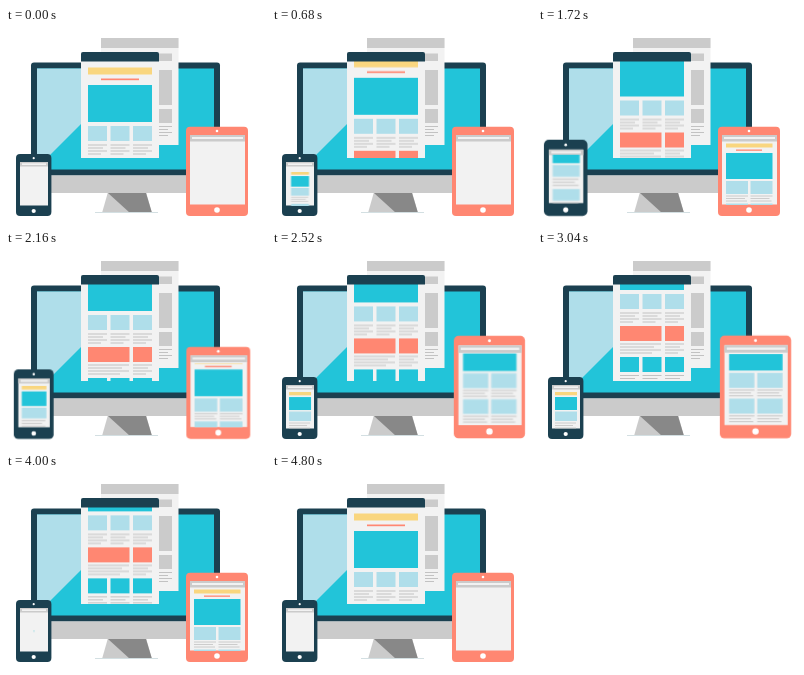
Animation of 260 by 195 pixels, one loop 5040 ms. Source, as an HTML page:

```html
<!DOCTYPE html>
<html lang="en">
<head>
<meta charset="utf-8">
<title>Responsive page</title>
<style>
  html, body { margin: 0; width: 100%; height: 100%; overflow: hidden; background: #fff; }
  svg { display: block; width: 100vw; height: 100vh; }

  .dark { fill: #1b4050; }
  .cyan { fill: #22c4d9; }
  .pale { fill: #afdeea; }
  .coral { fill: #ff8772; }
  .yellow { fill: #f9d67f; }
  .paper { fill: #f2f2f2; }
  .grey { fill: #cbcbcb; }
  .white { fill: #fff; }
  .text { fill: none; stroke: #c2c2c2; }

  .move { animation: 5040ms cubic-bezier(.65, 0, .35, 1) infinite; }
  #deskScroll { animation-name: deskScroll; animation-timing-function: linear; }
  #phone { animation-name: phoneGrow; transform-origin: 27.7px 188px; }
  #phonePage { animation-name: phonePage; transform-origin: 28px 157px; }
  #phoneScroll { animation-name: phoneScroll; }
  #tablet { animation-name: tabletGrow; transform-origin: 211px 188px; }
  #tabletPage { animation-name: tabletPage; transform-origin: 211px 142px; }
  #tabletScroll { animation-name: tabletScroll; }

  @keyframes deskScroll {
    0%, 4.76% { transform: translateY(0); }
    25.4% { transform: translateY(-17px); }
    42.86% { transform: translateY(-34px); }
    60.32% { transform: translateY(-55px); }
    69.84% { transform: translateY(-67.5px); }
    73.02% { transform: translateY(-67.5px); animation-timing-function: cubic-bezier(.45, 0, .55, 1); }
    95.24%, 100% { transform: translateY(0); }
  }
  @keyframes phoneGrow {
    0%, 17.86% { transform: scale(1); }
    32.14%, 35.9% { transform: scale(1.23); }
    50.2%, 100% { transform: scale(1); }
  }
  @keyframes phonePage {
    0%, 4.37% { transform: scale(0); }
    18.65%, 67.94% { transform: scale(1); }
    82.22%, 100% { transform: scale(0); }
  }
  @keyframes phoneScroll {
    0%, 25.4% { transform: translateY(0); }
    34.1% { transform: translateY(-14px); }
    44.8%, 100% { transform: translateY(0); }
  }
  @keyframes tabletGrow {
    0%, 37.6% { transform: translate(0, 0) scale(1); }
    51.89%, 63.99% { transform: translate(6.5px, -.7px) scale(1.15); }
    78.27%, 100% { transform: translate(0, 0) scale(1); }
  }
  @keyframes tabletPage {
    0%, 17.14% { transform: scale(0); }
    31.43%, 80.95% { transform: scale(1); }
    93.65%, 100% { transform: scale(0); }
  }
  @keyframes tabletScroll {
    0%, 37.6% { transform: translateY(0); }
    51.89%, 63.99% { transform: translateY(-22px); }
    78.27%, 100% { transform: translateY(0); }
  }
</style>
</head>
<body>
<svg viewBox="0 0 260 195" preserveAspectRatio="none">
  <defs>
    <clipPath id="deskClip"><rect x="75" y="33.5" width="78" height="96.5"/></clipPath>
    <clipPath id="phoneClip"><rect x="14" y="139" width="28" height="38.500"/></clipPath>
    <clipPath id="tabletClip"><rect x="184" y="115" width="55" height="61.5"/></clipPath>
    <path id="lines" class="text" d="M0 .5h19M0 3.5h15M0 6.5h19M0 9.5h13"/>
    <path id="wideLines" class="text" d="M0 .5h41M0 3.5h34M0 6.5h41M0 9.5h32"/>
    <path id="tabletLines" class="text" stroke-width=".8" d="M0 .5h22M0 3h19M0 5.5h21"/>
    <g id="tabletRow">
      <path class="pale" d="M188 0h22v13h-22zM212.5 0h22v13h-22z"/>
      <use href="#tabletLines" x="188" y="14.5"/>
      <use href="#tabletLines" x="212.5" y="14.5"/>
    </g>
    <g id="deskText">
      <use href="#lines" x="82"/>
      <use href="#lines" x="104.5"/>
      <use href="#lines" x="127"/>
    </g>
    <path id="trio" d="M82 0h19v15h-19zM104.5 0h19v15h-19zM127 0h19v15h-19z"/>
  </defs>

  <!-- monitor -->
  <path class="grey" d="M102 164h38l6 21H96z"/>
  <path fill="#888" d="M102 165h38l6 20H124z"/>
  <path fill="none" stroke="#d3dfe2" d="M89 184.500h63"/>
  <path class="dark" d="M28 34.500h183q3 0 3 3v110H25v-110q0-3 3-3z"/>
  <path class="grey" d="M25 147.500h189v14.500q0 3-3 3H28q-3 0-3-3z"/>
  <rect class="cyan" x="31" y="40.500" width="177" height="101"/>
  <path class="pale" d="M31 40.500h99.500L31 140z"/>

  <!-- back page -->
  <rect class="paper" x="95" y="10" width="77.500" height="107"/>
  <rect class="grey" x="95" y="10" width="77.500" height="10"/>
  <path class="grey" d="M153 25.500h13v7.500h-13zM153 42h13v35h-13zM153 81h13v14h-13z"/>
  <path class="text" d="M153 98.500h13M153 101.500h9M153 104.500h13M153 107.500h9"/>

  <!-- front page -->
  <rect class="paper" x="75" y="24" width="78" height="106"/>
  <g clip-path="url(#deskClip)">
    <g id="deskScroll" class="move">
      <rect class="yellow" x="82" y="39.500" width="64" height="7"/>
      <rect class="coral" x="95" y="50.500" width="38" height="1.700"/>
      <rect class="cyan" x="82" y="57" width="64" height="37"/>
      <use href="#trio" class="pale" y="98"/>
      <use href="#deskText" y="116.500"/>
      <path class="coral" d="M82 130h41.500v15H82zM127 130h19v15h-19z"/>
      <use href="#wideLines" x="82" y="147.500"/>
      <use href="#lines" x="127" y="147.500"/>
      <use href="#trio" class="cyan" y="161"/>
      <use href="#deskText" y="179"/>
    </g>
  </g>
  <path class="dark" d="M75 33.500V26q0-2 2-2h74q2 0 2 2v7.500z"/>

  <!-- phone -->
  <g id="phone" class="move">
    <rect class="dark" x="10" y="126" width="35.400" height="62" rx="4"/>
    <rect class="paper" x="14" y="134" width="28" height="43.500"/>
    <rect class="grey" x="14" y="134" width="28" height="4.500"/>
    <rect class="paper" x="16" y="135.300" width="24" height="1.700"/>
    <circle class="white" cx="27.700" cy="130.200" r="1.100"/>
    <circle class="white" cx="27.700" cy="183" r="2.100"/>
    <g clip-path="url(#phoneClip)">
      <g id="phonePage" class="move">
        <g id="phoneScroll" class="move">
          <rect class="yellow" x="17" y="141" width="22" height="3.300"/>
          <rect class="cyan" x="17" y="146" width="22" height="13"/>
          <rect class="pale" x="17" y="160.500" width="22" height="9.500"/>
          <path class="text" stroke-width=".8" d="M17 172h21M17 174.500h18M17 177h21"/>
          <rect class="pale" x="17" y="180" width="22" height="9.500"/>
          <path class="text" stroke-width=".8" d="M17 191.500h21M17 194h18"/>
        </g>
      </g>
    </g>
  </g>

  <!-- tablet -->
  <g id="tablet" class="move">
    <rect class="coral" x="180" y="98.700" width="62" height="89.300" rx="4"/>
    <rect class="paper" x="184" y="107" width="55" height="69.500"/>
    <rect class="grey" x="184" y="107" width="55" height="6.500"/>
    <rect class="paper" x="186" y="109" width="51" height="2"/>
    <circle class="white" cx="211" cy="103" r="1.300"/>
    <circle class="white" cx="211" cy="182" r="2.800"/>
    <g clip-path="url(#tabletClip)">
      <g id="tabletPage" class="move">
        <g id="tabletScroll" class="move">
          <rect class="yellow" x="188" y="115.500" width="46.500" height="4"/>
          <rect class="coral" x="198" y="121.500" width="26" height="1.300"/>
          <rect class="cyan" x="188" y="125" width="46.500" height="26"/>
          <use href="#tabletRow" y="153"/>
          <use href="#tabletRow" y="175.500"/>
        </g>
      </g>
    </g>
  </g>
</svg>
</body>
</html>
```
